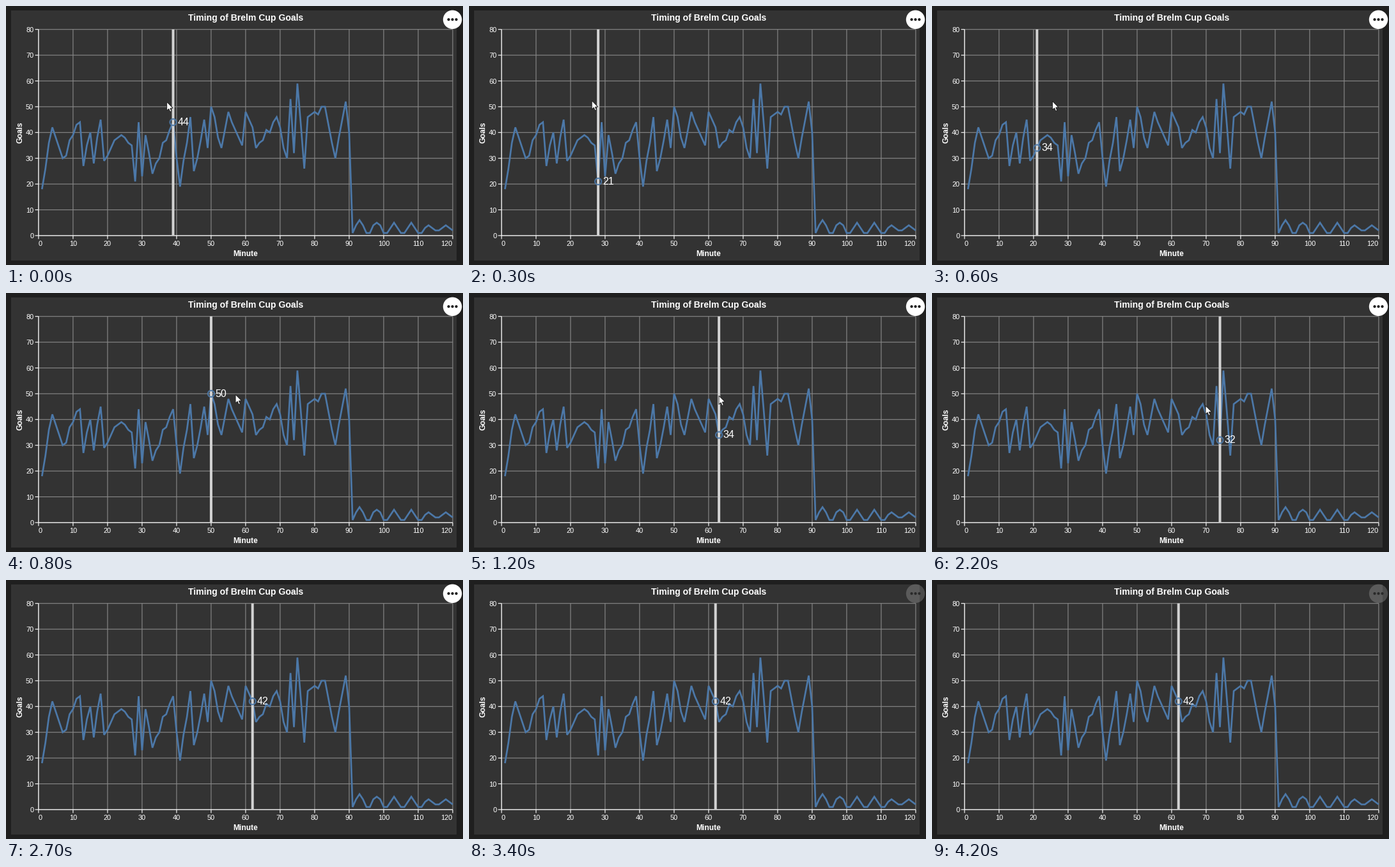
Animation of 715x406 px, one loop 4300 ms. Source, as a matplotlib script:

```python
import numpy as np
import matplotlib.pyplot as plt
from matplotlib.animation import FuncAnimation
from matplotlib.patches import Circle, Polygon, Rectangle

W, H, DPI = 715, 406, 64
PX = 72 / DPI  # points per pixel
STEP, FRAMES = 100, 43

PAGE, PANEL, GRID, BLUE, BAR = "#1f1f1f", "#333333", "#888888", "#4c78a8", "#d3d3d3"

# Main peaks and dips of the series: minute, goals
TURNS = [
    (1, 18), (4, 42), (7, 30), (12, 44), (13, 27), (15, 40), (16, 28), (18, 45),
    (19, 29), (24, 39), (27, 35), (28, 21), (29, 44), (30, 23), (31, 39), (33, 24),
    (39, 44), (41, 19), (44, 46), (45, 25), (48, 45), (49, 34), (50, 50), (53, 34),
    (55, 48), (59, 35), (60, 48), (62, 42), (63, 34), (69, 46), (72, 30), (73, 53),
    (74, 32), (75, 59), (77, 26), (78, 46), (83, 50), (86, 30), (89, 52), (90, 40),
]

# Stops of the pointer: time in ms, x, y
STOPS = [
    (-100, 271.5, 151), (500, 152.5, 147), (894, 391, 161), (1400, 391, 161),
    (1790, 502, 188), (1950, 502, 188), (2450, 354, 165), (2700, 389, 178),
]
LAG, LEAVE = 50, 2700
FADE_MS, REST_ALPHA = 400, 0.2


def make_goals():
    """Straight runs between turns with a little wobble, then a low fading ripple."""
    rng = np.random.default_rng(4)
    keys, vals = zip(*TURNS)
    m = np.arange(1, 121)
    wobble = np.where(np.isin(m, keys), 0, rng.uniform(-2, 2, m.size))
    play = np.interp(m, keys, vals) + wobble
    ripple = 2.8 + 3 * np.cos(2 * np.pi * (m - 93) / 5) * np.exp((93 - m) / 30)
    return np.rint(np.where(m <= 90, play, np.maximum(ripple, 1))).astype(int)


def sx(minute):
    return 50.9 + 5.4 * minute


def sy(goals):
    return 359.9 - 4.04 * goals


def pointer(t):
    for k, (a, b) in enumerate(zip(STOPS, STOPS[1:])):
        if t <= b[0]:
            break
    u = min((t - a[0]) / (b[0] - a[0]), 1)
    if k:  # the first sweep is already under way, at steady speed
        u = (1 - np.cos(np.pi * u)) / 2
    return a[1] + (b[1] - a[1]) * u, a[2] + (b[2] - a[2]) * u


fig = plt.figure(figsize=(W / DPI, H / DPI), dpi=DPI, facecolor=PAGE)
ax = fig.add_axes([0, 0, 1, 1])
ax.set_xlim(0, W)
ax.set_ylim(H, 0)
ax.axis("off")


def stroke(xs, ys, color, width=1.15, z=2, **kw):
    return ax.plot(xs, ys, color=color, lw=width * PX, zorder=z, snap=False,
                   solid_capstyle="butt", **kw)[0]


def label(x, y, s, size, ha="center", **kw):
    return ax.text(x, y, s, color="white", fontsize=size * PX, ha=ha, va="baseline",
                   family="Liberation Sans", zorder=8, **kw)


ax.add_patch(Rectangle((8, 7), 697, 392, color=PANEL, lw=0, zorder=1))

# Grid, axes and tick labels
left, right, top, bottom = sx(0), sx(120), sy(80), sy(0)
for m in range(0, 121, 10):
    x = sx(m)
    stroke([x, x], [top, bottom], GRID)
    stroke([x, x], [bottom, bottom + 5.4], "white", z=3)
    edge = {0: "left", 120: "right"}.get(m, "center")
    label(x, 376, str(m), 11, edge)
for g in range(0, 81, 10):
    y = sy(g)
    stroke([left, right], [y, y], GRID)
    stroke([left - 5.4, left], [y, y], "white", z=3)
    label(43.3, y + 4, str(g), 11, "right")
stroke([left, left], [top, bottom], "white", z=3)
stroke([left, right], [bottom, bottom], "white", z=3)

label(374.7, 23, "Timing of Brelm Cup Goals", 14, weight="bold")
label(375, 392, "Minute", 12, weight="bold")
label(25, 198, "Goals", 12, weight="bold", rotation=90, rotation_mode="anchor")

goals = make_goals()
stroke(sx(np.arange(1, 121)), sy(goals), BLUE, 2.7, z=4, solid_joinstyle="miter")

# Hover marks
bar = stroke([0, 0], [top, bottom], BAR, 4, z=5)
ring = ax.add_patch(Circle((0, 0), 5, fill=False, ec=BLUE, lw=2.2 * PX, alpha=0.9, zorder=6))
value = label(0, 0, "", 16, "left")

# Menu button
disc = ax.add_patch(Circle((698.5, 21.3), 14.7, fc="white", lw=0, zorder=9))
dots = [ax.add_patch(Circle((698.5 + dx, 21.2), 2.1, lw=0, zorder=10)) for dx in (-6, 0, 6)]

ARROW = np.array([(0, 0), (0, 13.6), (3.1, 10.8), (5.1, 15.6), (7.3, 14.6),
                  (5.3, 10), (9.5, 9.7)])
arrow = ax.add_patch(Polygon(ARROW, fc="white", ec="#1a1a1a", lw=0.9 * PX, zorder=12))


def draw(i):
    t = i * STEP
    # The marks snap to the minute under the pointer a moment ago
    x, _ = pointer(min(t, LEAVE) - LAG)
    minute = round((x - sx(0)) / 5.4)
    score = goals[minute - 1]
    bx, by = sx(minute), sy(score)
    bar.set_xdata([bx, bx])
    ring.center = bx, by
    value.set_position((bx + 6.8, by + 4.8))
    value.set_text(str(score))

    arrow.set_visible(t < LEAVE)
    arrow.set_xy(ARROW + pointer(t))

    u = np.clip((t - LEAVE) / FADE_MS, 0, 1)
    alpha = 1 - (1 - REST_ALPHA) * u ** 1.8
    disc.set_alpha(alpha)
    shade = 0.08 * alpha + 0.18 * (1 - alpha)
    for dot in dots:
        dot.set_facecolor((shade,) * 3)
    return bar, ring, value, arrow, disc, *dots


anim = FuncAnimation(fig, draw, frames=FRAMES, interval=STEP, repeat=True, repeat_delay=0)
plt.show()
```
